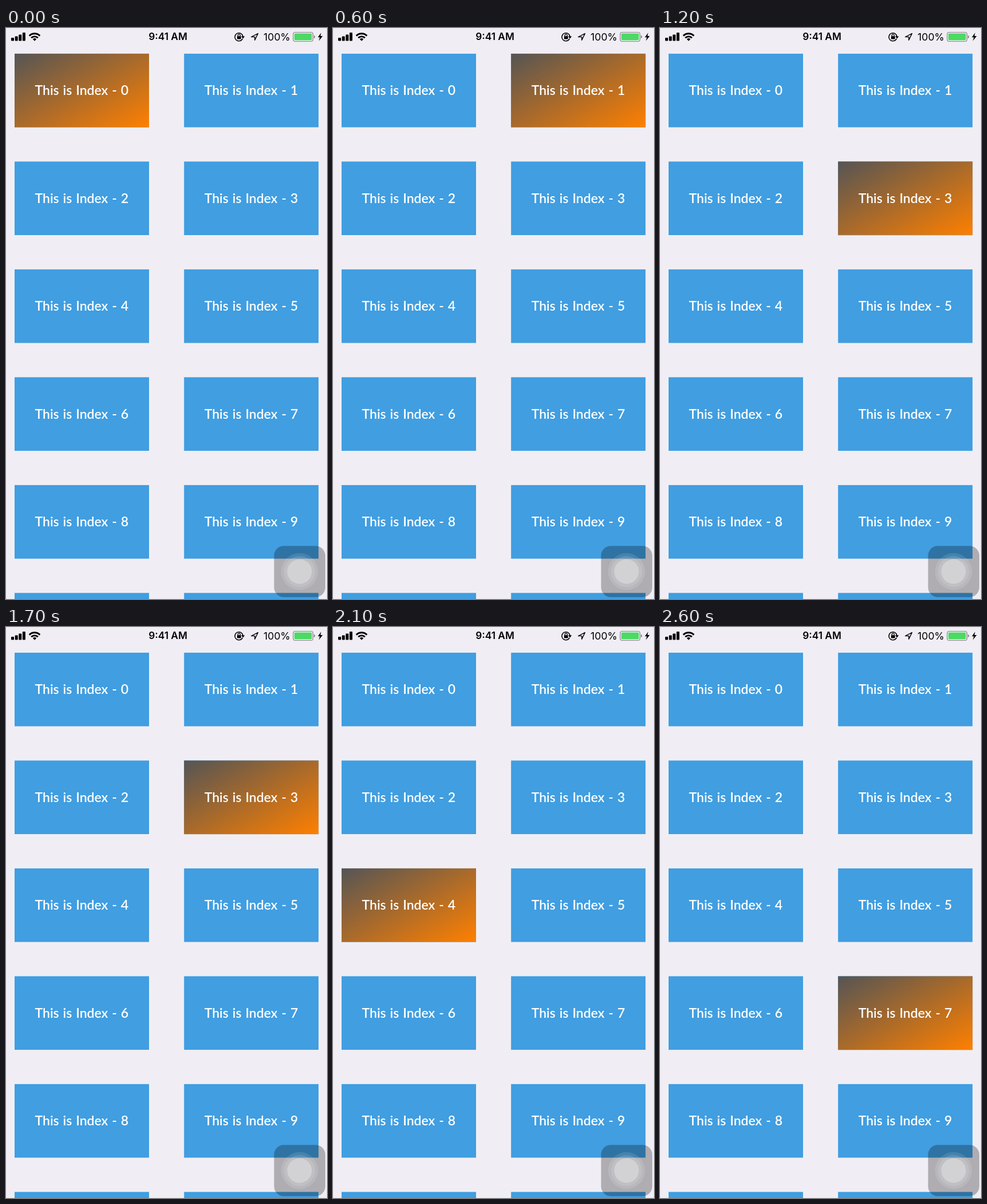
An HTML page that plays this animation: 561 by 998 pixels, repeating every 2.7 s.

```html
<!DOCTYPE html>
<html lang="en">
<head>
<meta charset="utf-8">
<title>Index grid</title>
<style>
  html, body { margin: 0; width: 100%; height: 100%; overflow: hidden; background: #f0eef4; }
  svg { display: block; width: 561px; height: 998px; }
  text { text-anchor: middle; }
  .cell { fill: #409ee1; }
  .label { font: 600 23px Lato, sans-serif; fill: #fff; word-spacing: 1.2px; }
  .status { font-family: Inter, sans-serif; fill: #000; }
  .stroke { fill: none; stroke: #000; }

  #highlight { fill: url(#warm); animation: hop 2700ms step-end infinite; }
  @keyframes hop {
    0%       { transform: translate(0, 0); }
    22.2222% { transform: translate(296.2px, 0); }
    44.4444% { transform: translate(296.2px, 188.5px); }
    66.6667% { transform: translate(0, 377px); }
    88.8889% { transform: translate(296.2px, 565.5px); }
    100%     { transform: translate(0, 0); }
  }
</style>
</head>
<body>
<svg viewBox="0 0 561 998">
  <defs>
    <linearGradient id="warm" x1="0" y1="0" x2="1" y2="1">
      <stop offset="0" stop-color="#555"/>
      <stop offset="1" stop-color="#ff8000"/>
    </linearGradient>
  </defs>

  <g id="cells"></g>
  <rect id="highlight" x="15" y="44.9" width="235" height="128.6"/>
  <g id="labels"></g>

  <!-- Signal and Wi-Fi -->
  <g>
    <rect x="9" y="17" width="5" height="5.5" rx="1"/>
    <rect x="15.7" y="14.5" width="5" height="8" rx="1"/>
    <rect x="22.3" y="11.5" width="5" height="11" rx="1"/>
    <rect x="28.9" y="8" width="5" height="14.5" rx="1"/>
  </g>
  <g class="stroke" stroke-width="2.9">
    <path d="M40.7 13.6a13.2 13.2 0 0 1 18.6 0"/>
    <path d="M44.2 17.2a8.3 8.3 0 0 1 11.6 0"/>
    <path d="M50 22.8l-3.2-3.3a4.7 4.7 0 0 1 6.4 0z" fill="#000" stroke="none"/>
  </g>

  <text class="status" x="283" y="21.4" font-size="17.3" font-weight="600">9:41 AM</text>

  <!-- Rotation lock -->
  <g class="stroke" stroke-width="1.5">
    <path d="M413.4 18.6a7 7 0 1 1 .6-3.4"/>
    <path d="M405.3 14.5v-1.7a2 2 0 0 1 4 0v1.7" stroke-width="1.3"/>
    <rect x="403.9" y="14.2" width="6.8" height="5.2" rx=".7" fill="#000" stroke="none"/>
    <path d="M411 14.6h6.4l-3.2 4z" fill="#000" stroke="none"/>
  </g>
  <path class="stroke" stroke-width="1.4" stroke-linejoin="round" d="M428.7 15.6L440.4 9.6L434.8 21.3V15.6Z"/>

  <text class="status" x="473.5" y="21.6" font-size="17.7">100%</text>

  <!-- Battery -->
  <rect x="502" y="7.5" width="34.5" height="16" rx="3.5" fill="none" stroke="#858487" stroke-width="1.2"/>
  <rect x="504" y="9.5" width="30.5" height="12" rx="1.8" fill="#4cd964"/>
  <path d="M538 12.8q2.2.7 2.2 2.7t-2.2 2.7z" fill="#858487"/>
  <path d="M550.8 8.2L545 16.3H548.5L546.8 22.6L553.5 14H549.5Z"/>

  <!-- Floating assist button -->
  <rect x="468.5" y="905.3" width="89.5" height="89.5" rx="17" fill-opacity=".27"/>
  <g fill="#fff">
    <circle cx="513" cy="950" r="32.3" fill-opacity=".11"/>
    <circle cx="513" cy="950" r="27" fill-opacity=".13"/>
    <circle cx="513" cy="950" r="21.5" fill-opacity=".27"/>
  </g>
</svg>
<script>
  const add = (parent, tag, attrs) => {
    const el = document.createElementNS("http://www.w3.org/2000/svg", tag);
    for (const name in attrs) el.setAttribute(name, attrs[name]);
    return document.getElementById(parent).appendChild(el);
  };

  for (let i = 0; i < 12; i++) {
    const x = 15 + (i % 2) * 296.2;
    const y = 44.9 + Math.floor(i / 2) * 188.5;
    add("cells", "rect", { class: "cell", x, y, width: 235, height: 128.6 });
    add("labels", "text", { class: "label", x: x + 117.3, y: y + 72.3 })
      .textContent = `This is Index - ${i}`;
  }
</script>
</body>
</html>
```
